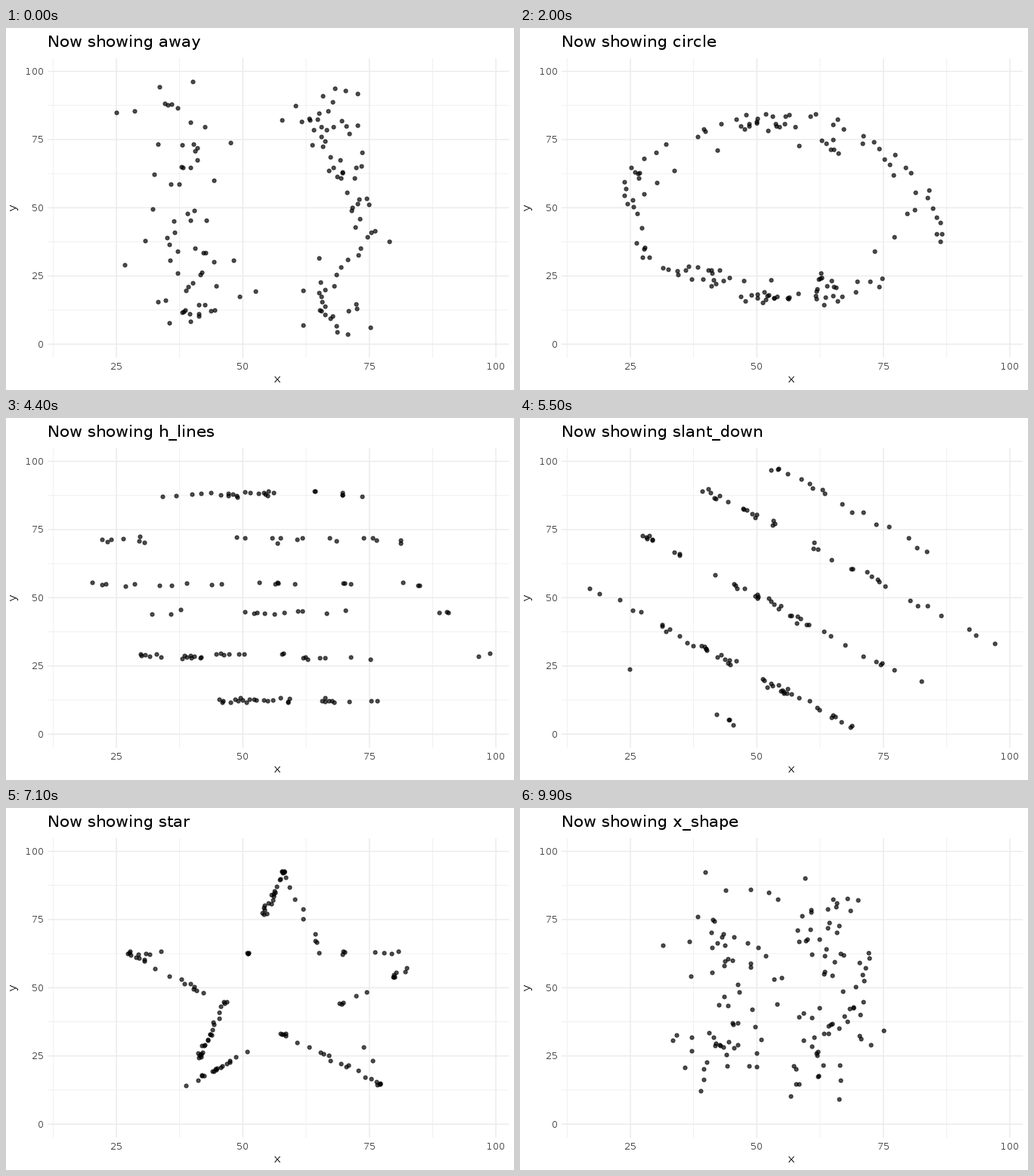
A matplotlib script for the animation above (10000 ms loop, 672x480 px).

```python
import matplotlib.pyplot as plt
import numpy as np
from matplotlib.animation import FuncAnimation

W, H, DPI = 672, 480, 96
N = 142
NAMES = ["away", "bullseye", "circle", "dino", "dots", "h_lines", "high_lines",
         "slant_down", "slant_up", "star", "v_lines", "wide_lines", "x_shape"]
COUNT = len(NAMES)
# Frame at which each shape is complete; the last three legs are a frame shorter.
ARRIVE = [0] + [8 * k - 1 - max(0, k - 10) for k in range(1, COUNT + 1)]

rng = np.random.default_rng(7)


def noise(sd, cols=2):
    return np.clip(rng.normal(0, sd, (N, cols)), -2 * sd, 2 * sd)


def nearest(values, levels):
    levels = np.asarray(levels)
    return levels[np.abs(values[:, None] - levels).argmin(axis=1)]


def stroke(n, *knots):
    """Space n points evenly along a polyline."""
    k = np.array(knots, float)
    length = np.concatenate([[0], np.cumsum(np.hypot(*np.diff(k, axis=0).T))])
    s = np.linspace(0, length[-1], n)
    return np.column_stack([np.interp(s, length, k[:, 0]), np.interp(s, length, k[:, 1])])


def dino():
    turn = np.linspace(0, 2 * np.pi, 11, endpoint=False)
    eye = np.column_stack([52 + 4.8 * np.cos(turn), 82 + 4.2 * np.sin(turn)])
    return np.vstack([
        stroke(28, (55, 97), (39, 85), (23, 66), (23, 53), (34, 51), (57, 56), (62, 69)),
        stroke(5, (57, 55), (48, 38)),
        stroke(10, (51, 44), (36, 30), (30, 37), (38, 49)),
        stroke(21, (30, 36), (30, 29), (42, 25), (56, 42), (70, 50), (70, 69)),
        eye,
        stroke(3, (29.5, 60), (31, 62.5)),
        stroke(20, (58, 99.5), (65, 97.5), (72, 86), (86, 48), (98, 34)),
        stroke(6, (57, 41), (64, 24)),
        stroke(12, (74, 23), (52, 18), (45, 14)),
        stroke(4, (49, 15), (56, 14)),
        stroke(4, (52, 12.5), (46, 6)),
        stroke(9, (50, 9.5), (78, 10.6)),
        stroke(3, (68, 8.7), (68, 3)),
        stroke(3, (38, 26), (41, 25)),
        stroke(3, (50, 96), (44, 92.5)),
    ])


def away():
    """Two loose columns with an empty oval between them."""
    found = []
    while len(found) < N:
        x = 54 + rng.choice([-15, 15]) + 4 * rng.standard_t(4)
        y = rng.uniform(0, 88) + rng.uniform(0, 9)
        if 15 < x < 92 and np.hypot((x - 57) / 14, (y - 48) / 20) > 1:
            found.append((x, y))
    return np.array(found)


def ring(base, centre, radius, sd):
    d = base - centre
    angle = np.arctan2(d[:, 1], d[:, 0]) + noise(.05, 1)[:, 0]
    r = radius + noise(sd, 1)[:, 0]
    return centre + np.column_stack([r * np.cos(angle), r * np.sin(angle)])


def bullseye(base):
    centre = np.array([54.8, 47.6])
    far = np.hypot(*(base - centre).T) > 27
    return ring(base, centre, np.where(far, 36.8, 17.8), .7)


def slant(base, sign, levels):
    """Push points onto the lines y + sign * x = level."""
    p = base + noise(1.4)
    s = p[:, 1] + sign * p[:, 0]
    shift = (nearest(s, levels) + noise(.9, 1)[:, 0] - s) / 2
    p += np.column_stack([sign * shift, shift])
    p[:, 1] = np.clip(p[:, 1], .3, 99.6)
    return p


def star(base):
    """Drop each point onto the nearest edge of a five-pointed star."""
    angle = np.pi / 2 + np.arange(10) * np.pi / 5
    r = np.where(np.arange(10) % 2, .382, 1)
    a = np.column_stack([58 + 32.4 * r * np.cos(angle), 49.5 + 43 * r * np.sin(angle)])
    edge = np.roll(a, -1, axis=0) - a
    rel = base[:, None] - a
    t = np.clip((rel * edge).sum(2) / (edge ** 2).sum(1), 0, 1)
    foot = a + t[..., None] * edge
    best = ((foot - base[:, None]) ** 2).sum(2).argmin(axis=1)
    return foot[np.arange(N), best] + noise(.35)


def x_shape():
    t = rng.uniform(-1, 1, N)
    slope = rng.choice([-1, 1], N)
    return np.column_stack([55 + 22 * t, 50 + 43 * t * slope]) + noise(1.2)


def two_bands(values, middle, gap):
    off = values - middle
    return middle + gap * np.sign(off) + off / 3


def build_shapes():
    d = dino()
    x, y = (d + noise(1.4)).T
    u, v = noise(.5).T
    xy = [
        away(),
        bullseye(d),
        ring(d, np.array([53.8, 49]), 30.8, .8),
        d,
        (nearest(d[:, 0], [26, 50.7, 75.5]) + u, nearest(d[:, 1], [17, 51.3, 83]) + v),
        (x, nearest(y, [10.5, 30, 50, 70, 90]) + u),
        (x, two_bands(d[:, 1], 50, 19) + v),
        slant(d, 1, [50, 71, 100.5, 130, 151.5]),
        slant(d, -1, [-57, -36, -6, 23, 47]),
        star(d),
        (nearest(x, [30.3, 50, 70, 89.5]) + u / 2, y),
        (two_bands(d[:, 0], 54, 11) + v, y),
        x_shape(),
    ]
    return [np.column_stack(s) if isinstance(s, tuple) else s for s in xy]


def px(x):
    return 146 + (x - 25) * 6.694


def py(y):
    return 419.2 - y * 3.617


shapes = build_shapes()
plt.rcParams.update({"font.family": "DejaVu Sans",
                     "text.hinting": "default", "text.hinting_factor": 1})
fig = plt.figure(figsize=(W / DPI, H / DPI), dpi=DPI, facecolor="white")
ax = fig.add_axes([0, 0, 1, 1])
ax.set_xlim(0, W)
ax.set_ylim(H, 0)
ax.axis("off")

LEFT, RIGHT, TOP, BOTTOM = 55, 665.3, 40, 437.3
PT = 72 / DPI


def grid(values, to_px, vertical, width):
    for v in values:
        p = to_px(v)
        xs, ys = ([p, p], [TOP, BOTTOM]) if vertical else ([LEFT, RIGHT], [p, p])
        ax.plot(xs, ys, color="#EBEBEB", lw=width * PT, snap=False,
                solid_capstyle="butt", zorder=1)


def label(x, y, text, size=11, color="black", ha="center", **kw):
    kw.setdefault("va", "baseline")
    return ax.text(x, y, text, size=size, color=color, ha=ha, **kw)


MAJOR, MINOR = np.arange(0, 101, 25), np.arange(12.5, 100, 25)
grid(MINOR, py, False, .71)
grid(MINOR, px, True, .71)
grid(MAJOR, py, False, 1.42)
grid(MAJOR[1:], px, True, 1.42)

for tick in MAJOR:
    label(49.7, py(tick) + 4.3, tick, 8.8, "#4D4D4D", "right")
    if tick:
        label(px(tick), 453, tick, 8.8, "#4D4D4D")
label(359.2, 470, "x")
label(17.2, 238.5, "y", ha="right", va="center", rotation=90)
title = label(LEFT, 25, "", 16, ha="left")
points = ax.scatter(np.zeros(N), np.zeros(N), s=3.9 ** 2, c="black", alpha=.7,
                    linewidths=.7, edgecolors="black", zorder=3)


def draw(frame):
    k = max(i for i in range(COUNT) if frame >= ARRIVE[i])
    steps = 4 if k < 10 else 3
    p = max(0, (frame - ARRIVE[k + 1] + steps) / steps)
    following = (k + 1) % COUNT
    pos = (1 - p) * shapes[k] + p * shapes[following]
    points.set_offsets(np.column_stack([px(pos[:, 0]), py(pos[:, 1])]))
    # The title switches halfway, except that the last one stays to the loop's end.
    shown = following if p >= .5 and following else k
    title.set_text("Now showing " + NAMES[shown])
    return points, title


anim = FuncAnimation(fig, draw, frames=100, interval=100, repeat=True, repeat_delay=0)
plt.show()
```
